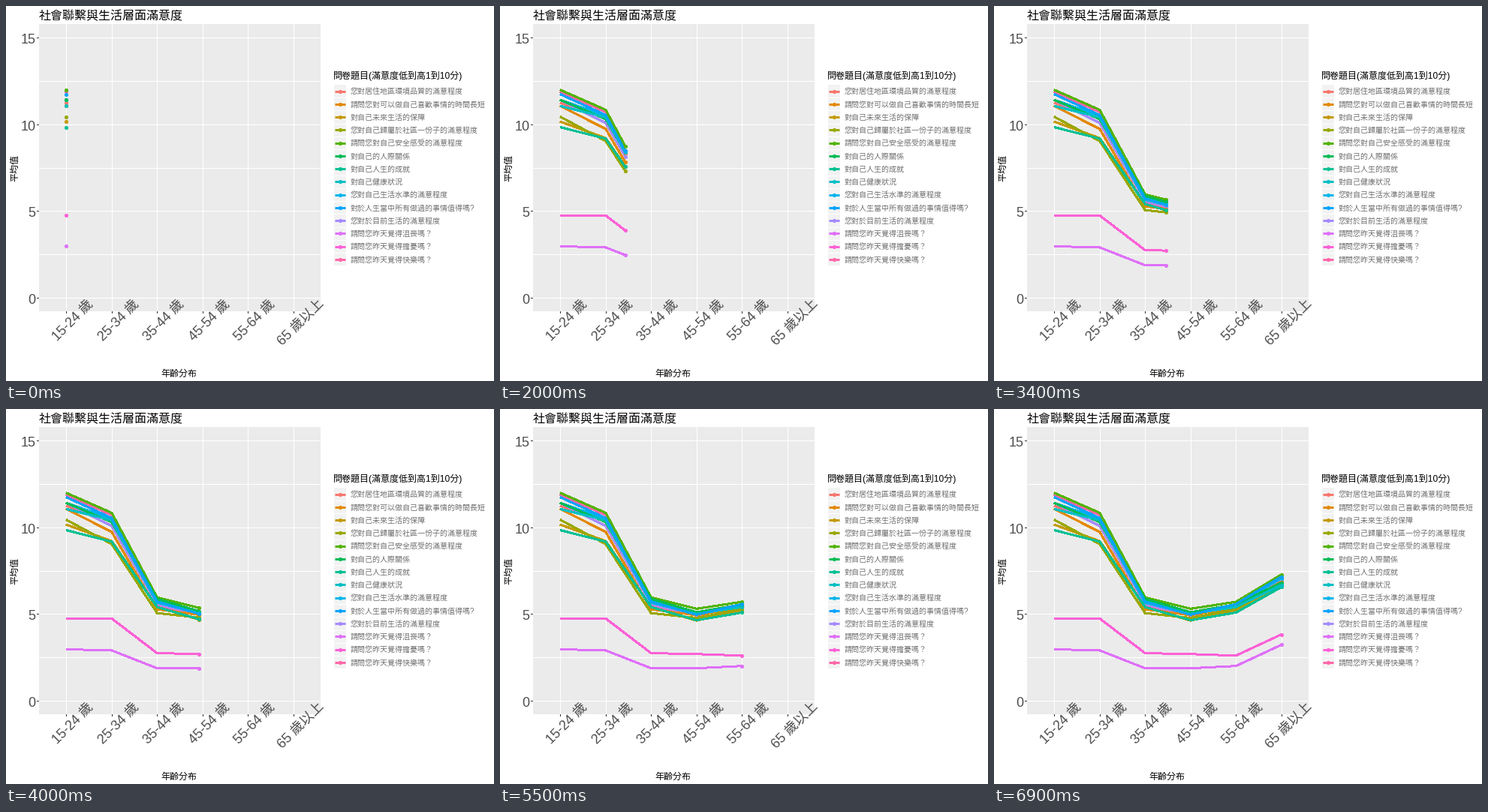
Write a matplotlib script that moves like this. It is 650 px wide and 500 px high and loops after 10 s.

```python
import numpy as np
import matplotlib.pyplot as plt
from matplotlib.animation import FuncAnimation
from matplotlib.patches import Rectangle

W, H, DPI = 650, 500, 100
PX = 72 / DPI  # points per pixel
STEPS, HOLD = 70, 30
GREY, PALE = "#4D4D4D", "#707070"

plt.rcParams["font.family"] = ["Liberation Sans", "Noto Sans CJK JP"]

AGES = ["15-24 歲", "25-34 歲", "35-44 歲", "45-54 歲", "55-64 歲", "65 歲以上"]

# label, colour, mean value per age group
SERIES = [
    ("您對居住地區環境品質的滿意程度", "#F8766D", (11.28, 10.40, 5.65, 4.95, 5.50, 7.10)),
    ("請問您對可以做自己喜歡事情的時間長短", "#E38900", (11.10, 9.78, 5.32, 4.98, 5.45, 6.90)),
    ("對自己未來生活的保障", "#C49A00", (10.20, 9.25, 5.45, 4.67, 5.25, 6.75)),
    ("您對自己歸屬於社區一份子的滿意程度", "#99A800", (10.48, 9.08, 5.10, 4.82, 5.33, 6.85)),
    ("請問您對自己安全感受的滿意程度", "#53B400", (12.03, 10.88, 6.00, 5.35, 5.75, 7.32)),
    ("對自己的人際關係", "#00BC56", (11.45, 10.35, 5.92, 5.15, 5.60, 6.85)),
    ("對自己人生的成就", "#00C094", (9.88, 9.22, 5.45, 4.69, 5.13, 6.60)),
    ("對自己健康狀況", "#00BFC4", (11.10, 10.45, 5.70, 5.05, 5.45, 6.72)),
    ("您對自己生活水準的滿意程度", "#00B6EB", (11.45, 10.55, 5.80, 5.05, 5.60, 7.10)),
    ("對於人生當中所有做過的事情值得嗎?", "#06A4FF", (11.78, 10.58, 5.75, 5.00, 5.62, 7.20)),
    ("您對於目前生活的滿意程度", "#A58AFF", (11.45, 10.12, 5.62, 4.97, 5.50, 7.00)),
    ("請問您昨天覺得沮喪嗎？", "#DF70F8", (3.01, 2.95, 1.92, 1.92, 2.05, 3.27)),
    ("請問您昨天覺得擔憂嗎？", "#FB61D7", (4.79, 4.79, 2.79, 2.74, 2.65, 3.87)),
    ("請問您昨天覺得快樂嗎？", "#FF66A8", (11.93, 10.75, 5.50, 5.02, 5.50, 7.12)),
]
UNDER = (0, 13, 10, 8)  # series lying beneath the others

fig = plt.figure(figsize=(W / DPI, H / DPI), dpi=DPI, facecolor="white")
ax = fig.add_axes([0, 0, 1, 1])
ax.set(xlim=(0, W), ylim=(H, 0))
ax.axis("off")


def px_x(group):
    return 80.3 + 60.48 * np.asarray(group)


def px_y(value):
    return 390.1 - 23.13 * np.asarray(value)


def box(x, y, w, h, color):
    ax.add_patch(Rectangle((x, y), w, h, fc=color, lw=0))


def label(x, y, s, size, color="black", **kw):
    """Text whose glyphs are centred on y."""
    ax.text(x, y + 0.37 * size, s, size=size * PX, color=color, va="baseline", **kw)


def stroke(x, y, color, z, width, smooth):
    return ax.plot(x, y, color=color, lw=width * PX, zorder=z, antialiased=smooth,
                   solid_capstyle="butt", solid_joinstyle="round")[0]


def dot(x, y, color, z):
    return ax.plot(x, y, "o", color=color, ms=5.2 * PX, mew=0, zorder=z)[0]


def draw_panel():
    box(44, 24, 375, 383, "#EBEBEB")
    for v in (0, 2.5, 5, 7.5, 10, 12.5, 15):
        y = int(px_y(v) - 0.5)
        box(44, y, 375, 1, "white")
        if v % 5 == 0:
            box(41, y, 3, 1, "#333333")
            label(39.5, y + 1, f"{v}", 18, GREY, ha="right")
    for i, age in enumerate(AGES):
        x = round(float(px_x(i)))
        box(x, 24, 1, 383, "white")
        box(x, 407, 1, 3, "#333333")
        ax.text(x + 13, 422.5 + 2 * (i == 5), age, size=18 * PX, color=GREY,
                rotation=45, rotation_mode="anchor", ha="center", va="baseline")
    label(44, 12.5, "社會聯繫與生活層面滿意度", 16)
    label(230.5, 489, "年齡分布", 12, ha="center")
    ax.text(15.5, 216, "平均值", size=12 * PX, color="black", rotation=90,
            rotation_mode="anchor", ha="center", va="baseline")


def draw_legend():
    label(436, 93, "問卷題目(滿意度低到高1到10分)", 12)
    box(437, 105, 16, 241, "#F2F2F2")
    for i, (name, color, _) in enumerate(SERIES):
        y = 113.5 + 17.25 * i
        if i:
            box(437, round(y - 8.6), 16, 1, "white")
        stroke([438, 452], [y, y], color, 3, 3, True)
        dot([445], [y], color, 4)
        label(459, y, name, 10, PALE)


draw_panel()
draw_legend()

order = list(UNDER) + [i for i in range(len(SERIES)) if i not in UNDER]
shown = [SERIES[i] for i in order]
# hard-edged strokes fill every pixel they touch, hence the smaller width
lines = [stroke([], [], s[1], 5, 2, False) for s in shown]
heads = [dot([], [], s[1], 6) for s in shown]

groups = np.arange(len(AGES))
# each age group is reached on a whole step
keys = np.round(groups * (STEPS - 1) / groups[-1])


def draw(frame):
    pos = np.interp(min(frame, STEPS - 1), keys, groups)
    seen = np.append(groups[groups < pos], pos)
    for (_, _, values), line, head in zip(shown, lines, heads):
        x, y = px_x(seen), px_y(np.interp(seen, groups, values))
        line.set_data(x, y)
        head.set_data(x[-1:], y[-1:])
    return lines + heads


anim = FuncAnimation(fig, draw, frames=STEPS + HOLD, interval=100,
                     init_func=lambda: draw(0), repeat=True, repeat_delay=0,
                     blit=False)
plt.show()
```
